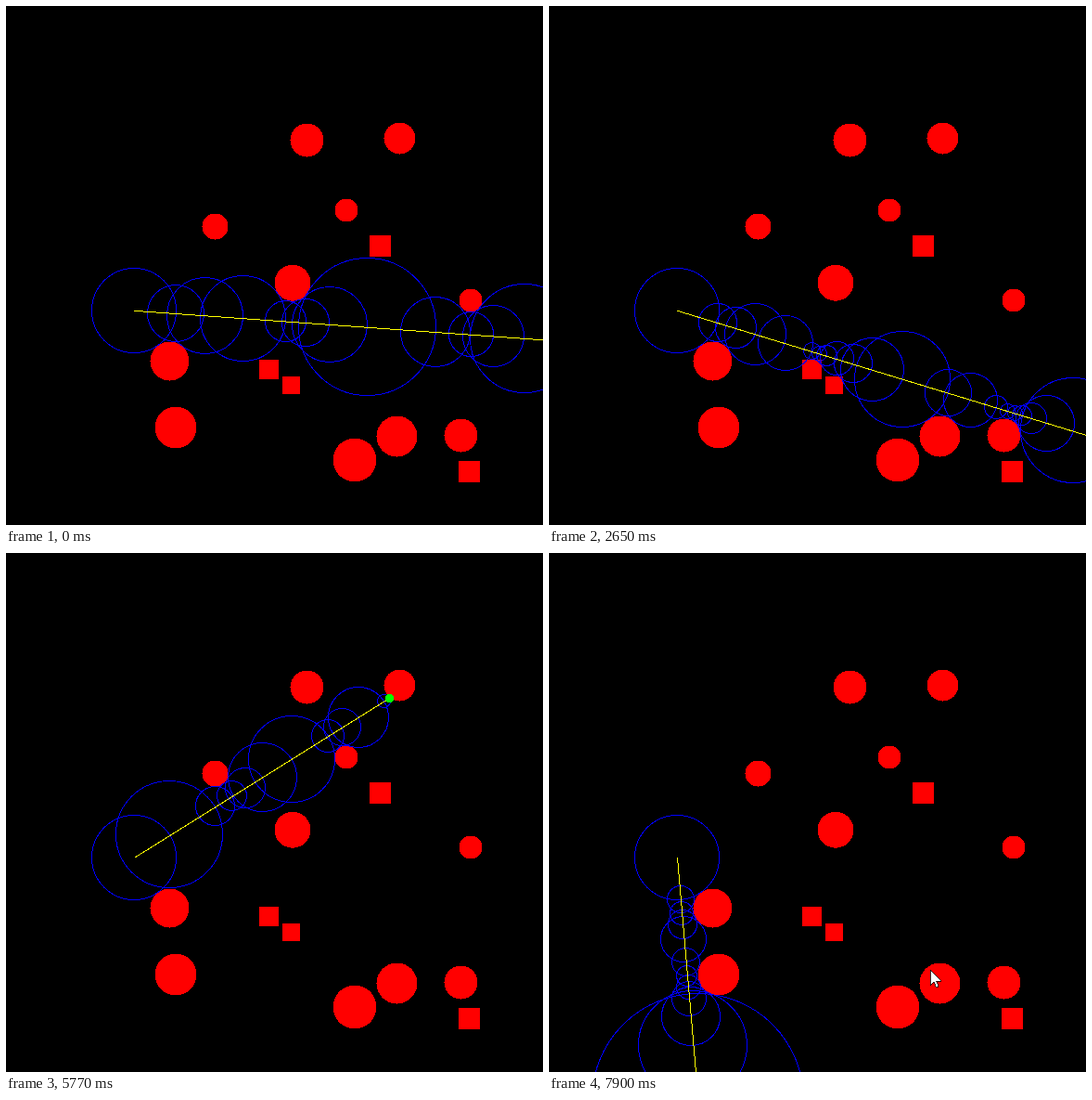
An HTML page for the animation above (8 s loop, 579 by 559 pixels).

```html
<!DOCTYPE html>
<html lang="en">
<head>
<meta charset="utf-8">
<title>Ray marching</title>
<style>
  html, body { margin: 0; width: 100%; height: 100%; overflow: hidden; background: #000; }
  svg { display: block; shape-rendering: crispEdges; }
</style>
</head>
<body>
<svg width="579" height="559" viewBox="0 0 579 559">
  <rect width="579" height="559" fill="#000"/>
  <g id="solids" fill="#f00"></g>
  <g transform="translate(.5 .5)">
    <path id="rings" fill="none" stroke="#00f"/>
    <path id="ray" fill="none" stroke="#ff0"/>
    <circle id="hit" r="4.6" fill="#0f0"/>
  </g>
  <path id="cursor" d="M0 0V16.5L4 13L6.6 19L9.2 18L6.6 12H12Z" fill="#fff" stroke="#000" stroke-width=".8"/>
</svg>
<script>
const LOOP = 8000, LIMIT = 600, EPS = 0.3, START_ANGLE = 0.0713;
const ORIGIN = { x: 138, y: 327.8 };

const disc = (x, y, r) => ({ x, y, r });
const box = (x, y, r) => ({ x, y, r, square: true });
const solids = [
  disc(324.5, 144.5, 18), disc(424.5, 142.5, 17), disc(225.5, 237.5, 14),
  disc(367, 220, 12.5), disc(309, 298.2, 19.6), disc(501, 317, 12.5),
  disc(176.5, 382.5, 21.1), disc(183, 454, 22.5), disc(376, 489, 23.5),
  disc(421.5, 463.5, 22.3), disc(490.5, 462.5, 18.3),
  box(403.5, 258.5, 11.5), box(283.5, 391.5, 10.5),
  box(307.5, 408.5, 9.9), box(499.5, 501.5, 11.5)
];

// The ray turns in bursts of even steps; a burst of one step is a jump.
const sweep = (from, until, steps, angle, power = 1) => ({ from, until, steps, angle, power });
const jump = (at, angle) => sweep(at, at, 1, angle);
const sweeps = [
  sweep(660, 920, 3, 0.366, 1.3),
  sweep(1480, 1600, 2, 0.541, 0.15),
  jump(1850, 0.599),
  sweep(2380, 2650, 3, 0.2954, 2),
  sweep(2770, 2890, 2, 0.122),
  sweep(3140, 3540, 4, -0.3667),
  jump(3930, -0.5),
  jump(4340, -0.578),
  sweep(4650, 4770, 2, -0.642),
  jump(5770, -0.5585),
  sweep(5910, 6450, 5, 0.1755),
  jump(6570, 0.2954),
  jump(6880, 0.366),
  sweep(7030, 7760, 7, 1.22, 1.3),
  jump(7900, 1.4844)
];

const el = id => document.getElementById(id);

// Boxes count as discs here, so a ray may clip their corners.
const clearance = (x, y) =>
  Math.min(...solids.map(s => Math.hypot(s.x - x, s.y - y) - s.r));

function solidTag({ x, y, r, square }) {
  const size = Math.floor(2 * r), h = size / 2;
  return square
    ? `<rect x="${x - h}" y="${y - h}" width="${size}" height="${size}"/>`
    : `<circle cx="${x}" cy="${y}" r="${h}"/>`;
}

function angleAt(t) {
  let angle = START_ANGLE;
  for (const s of sweeps) {
    if (t < s.from) break;
    const gap = (s.until - s.from) / (s.steps - 1);
    const done = t >= s.until ? s.steps : 1 + Math.floor((t - s.from) / gap);
    angle += (s.angle - angle) * (done / s.steps) ** s.power;
  }
  return angle;
}

function march(angle) {
  const dx = Math.cos(angle), dy = Math.sin(angle), rings = [];
  let { x, y } = ORIGIN;
  for (let i = 0; i < 200; i++) {
    if (x < 0 || y < 0 || x > LIMIT || y > LIMIT) return { x, y, rings, hit: false };
    const r = clearance(x, y);
    if (r < EPS) break;
    rings.push({ x, y, r });
    x += dx * r;
    y += dy * r;
  }
  return { x, y, rings, hit: true };
}

// Rings snap to whole pixels: corner and diameter are both cut down.
function ringPath({ x, y, r }) {
  const size = Math.floor(2 * r), h = size / 2;
  const left = Math.floor(x - r), mid = Math.floor(y - r) + h;
  return size < 1 ? "" : `M${left} ${mid}a${h} ${h} 0 1 1 ${size} 0a${h} ${h} 0 1 1 ${-size} 0`;
}

function drawCursor(t) {
  const left = Math.max(0, (7760 - t) / 240);
  el("cursor").style.display = left > 1 ? "none" : "";
  el("cursor").setAttribute("transform", `translate(${411 + 153 * left} ${449 + 7 * left})`);
}

function draw(t) {
  const { x, y, rings, hit } = march(angleAt(t));
  el("rings").setAttribute("d", rings.map(ringPath).join(""));
  el("ray").setAttribute("d", `M${ORIGIN.x} ${ORIGIN.y}L${x} ${y}`);
  el("hit").setAttribute("cx", Math.round(x));
  el("hit").setAttribute("cy", Math.round(y));
  el("hit").style.display = hit ? "" : "none";
  drawCursor(t);
}

el("solids").innerHTML = solids.map(solidTag).join("");
const start = performance.now();
function tick() {
  draw((performance.now() - start) % LOOP);
  requestAnimationFrame(tick);
}
tick();
</script>
</body>
</html>
```
